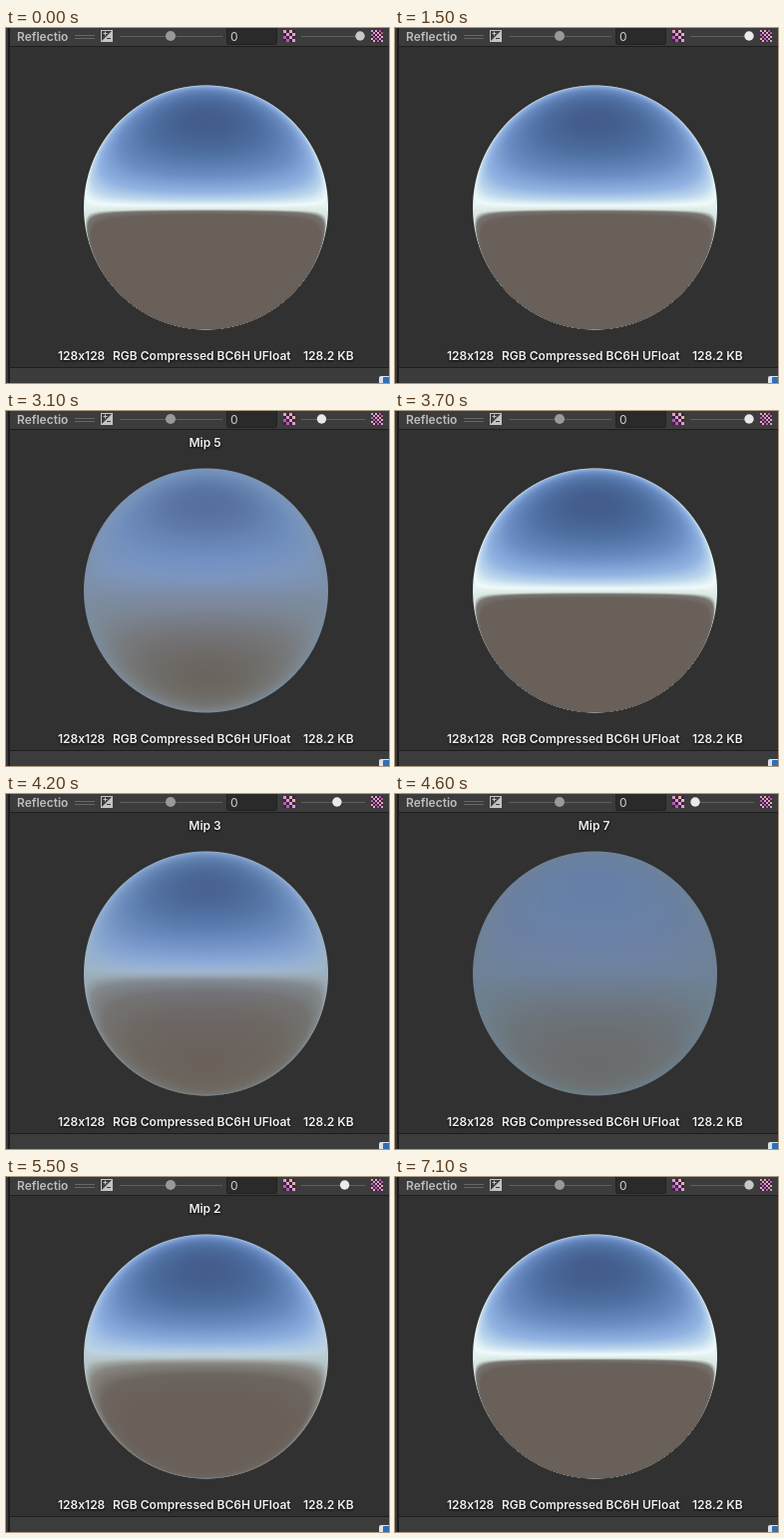
An HTML page with a canvas that plays this animation: 384 by 356 pixels, repeating every 7.6 s.

```html
<!DOCTYPE html>
<html lang="en">
<head>
<meta charset="utf-8">
<title>Reflection preview</title>
<style>
  html, body { margin: 0; width: 100%; height: 100%; overflow: hidden; background: #313131; }
  svg, canvas { position: absolute; left: 0; top: 0; display: block; }
  canvas { left: 77px; top: 56px; }
  text { font: 600 12px Inter, Roboto, sans-serif; fill: #f0f0f0; white-space: pre; }
  .shadow text { paint-order: stroke; filter: drop-shadow(0 1px 1px #000); }
  text.bar { fill: #bdbdbd; }
  text.value { font-weight: 400; fill: #d2d2d2; }
</style>
</head>
<body>
<svg width="384" height="356" viewBox="0 0 384 356">
  <rect width="384" height="356" fill="#313131"/>
  <rect width="384" height="18" fill="#3c3c3c"/>
  <rect y="341" width="384" height="15" fill="#3c3c3c"/>
  <path d="M3 18.5H384M3 340.5H384" stroke="#1d1d1d"/>
  <rect width="3" height="356" fill="#383838"/>
  <rect x="2" width="2" height="356" fill="#1c1c1c"/>

  <text class="bar" x="11" y="13">Reflectio</text>
  <path d="M69 7.5H89M69 10.5H89" stroke="#676767"/>

  <rect x="95.5" y="2.5" width="11" height="11" fill="#3c3c3c" stroke="#c4c4c4"/>
  <path d="M106 3V13H96Z" fill="#c4c4c4"/>
  <path d="M97.500 5.500H101.500M99.500 3.500V7.500" stroke="#c4c4c4"/>
  <path d="M101 10.500H105" stroke="#3c3c3c"/>

  <path d="M114 8.500H217M296 8.500H360" stroke="#606060"/>
  <circle cx="165" cy="8" r="5" fill="#999"/>
  <rect x="221.5" y="-2" width="50" height="18.500" rx="2" fill="#2a2a2a" stroke="#212121"/>
  <text class="value" x="225" y="13">0</text>
  <g id="checkers"></g>
  <circle id="knob" cy="8" r="4.700"/>

  <g class="shadow">
    <text id="label" x="199.500" y="36" text-anchor="middle"></text>
    <text x="52" y="333">128x128</text>
    <text x="107" y="333">RGB Compressed BC6H UFloat</text>
    <text x="298" y="333">128.2 KB</text>
  </g>

  <rect x="374" y="349" width="12" height="9" rx="2" fill="#d8e2ec"/>
  <rect x="378" y="350" width="8" height="8" rx="1" fill="#2f6fb5"/>
</svg>
<canvas id="ball" width="248" height="248"></canvas>
<script>
const LOOP = 7600;
const byId = id => document.getElementById(id);
const ball = byId('ball').getContext('2d');

// [start time in ms, mip level]
const steps = [
  [0, 0], [1700, 1], [1800, 3], [2000, 4], [2100, 5], [2300, 6], [2500, 7], [2700, 6],
  [3000, 5], [3200, 4], [3300, 3], [3400, 2], [3500, 1], [3700, 0],
  [4100, 1], [4200, 3], [4300, 4], [4400, 5], [4600, 7],
  [5100, 6], [5200, 5], [5300, 4], [5400, 3], [5500, 2], [5800, 1], [6000, 0]
];

// Environment colour by height of the reflected ray, from ground to zenith
const heights = [-1, -.6, -.3, -.12, -.06, -.03, .03, .12, .25, .5, .75, 1];
const palettes = {
  0: '696059 696059 696059 696059 777470 d8e6e2 effafa bcd7ec 92b3e2 6b8dc4 5173a6 425c8b',
  2: '696059 696059 6c645e 86857f a3aaa9 b4c3c6 bdd3e0 a9c6e6 8cadde 6a8bc1 5071a4 435d8c',
  4: '6a625d 73716f 7b828a 7e8c9f 7f90a7 7f92ab 8097b4 809ac0 7f9bc6 7190bf 6080b0 4e6996',
  5: '6b655f 757779 7b8592 7c8b9f 7c8ca3 7d8da6 7d90ad 7d93b5 7b95bd 7290bf 6683b2 566f9d',
  7: '6b6c6d 6c7379 6d7b88 6d7f91 6e8097 6e8198 6e819a 6e829c 6e82a0 6b80a2 6881a5 657fa8'
};

const mix = (a, b, k) => a.map((v, i) => v + (b[i] - v) * k);
const rgb = hex => [0, 2, 4].map(i => parseInt(hex.substr(i, 2), 16));
const parse = mip => palettes[mip].split(' ').map(rgb);

function paletteFor(mip) {
  if (palettes[mip]) return parse(mip);
  const above = parse(mip + 1);
  return parse(mip - 1).map((c, i) => mix(c, above[i], .5));
}

function sample(colors, h) {
  let i = 1;
  while (i < heights.length - 1 && heights[i] < h) i++;
  return mix(colors[i - 1], colors[i], (h - heights[i - 1]) / (heights[i] - heights[i - 1]));
}

function renderBall(mip) {
  const size = 248, radius = 122.5, colors = paletteFor(mip);
  const image = new ImageData(size, size);
  const tint = mip < 3 ? 0 : 4;
  for (let py = 0; py < size; py++) {
    for (let px = 0; px < size; px++) {
      const x = (px + .5 - 123.5) / radius, y = (124 - py - .5) / radius;
      const d = Math.hypot(x, y);
      const alpha = Math.min(1, radius * (1 - d) + .5);
      if (alpha <= 0) continue;
      const z = Math.sqrt(Math.max(0, 1 - d * d));
      const [r, g, b] = sample(colors, 2 * z * y);
      const facing = tint * (2 * z * z - 1);
      image.data.set([r, g, b + facing, alpha * 255], (py * size + px) * 4);
    }
  }
  return image;
}

function drawChecker(x, cells) {
  const side = 12 / cells;
  const shades = ['#d8a0c8', '#b45fa8', '#e0b4a0'];
  let out = `<rect x="${x}" y="2" width="12" height="12" fill="#42204a"/>`;
  for (let i = 0; i < cells * cells; i++) {
    const col = i % cells, row = (i - col) / cells;
    if ((col + row) % 2) continue;
    out += `<rect x="${x + col * side}" y="${2 + row * side}" width="${side}" height="${side}" fill="${shades[(col + 2 * row) % 3]}"/>`;
  }
  return out;
}

byId('checkers').innerHTML = drawChecker(278, 4) + drawChecker(366, 6);
const balls = Array.from({ length: 8 }, (_, mip) => renderBall(mip));
let shown = -1;

function update(t) {
  const mip = steps.filter(([start]) => start <= t).pop()[1];
  byId('knob').setAttribute('fill', t >= 1500 && t < 6400 ? '#eaeaea' : '#c8c8c8');
  if (mip === shown) return;
  shown = mip;
  byId('knob').setAttribute('cx', 355 - mip * 54 / 7);
  byId('label').textContent = mip ? 'Mip ' + mip : '';
  ball.putImageData(balls[mip], 0, 0);
}

const origin = performance.now();
function tick() {
  update((performance.now() - origin) % LOOP);
  requestAnimationFrame(tick);
}
tick();
</script>
</body>
</html>
```
